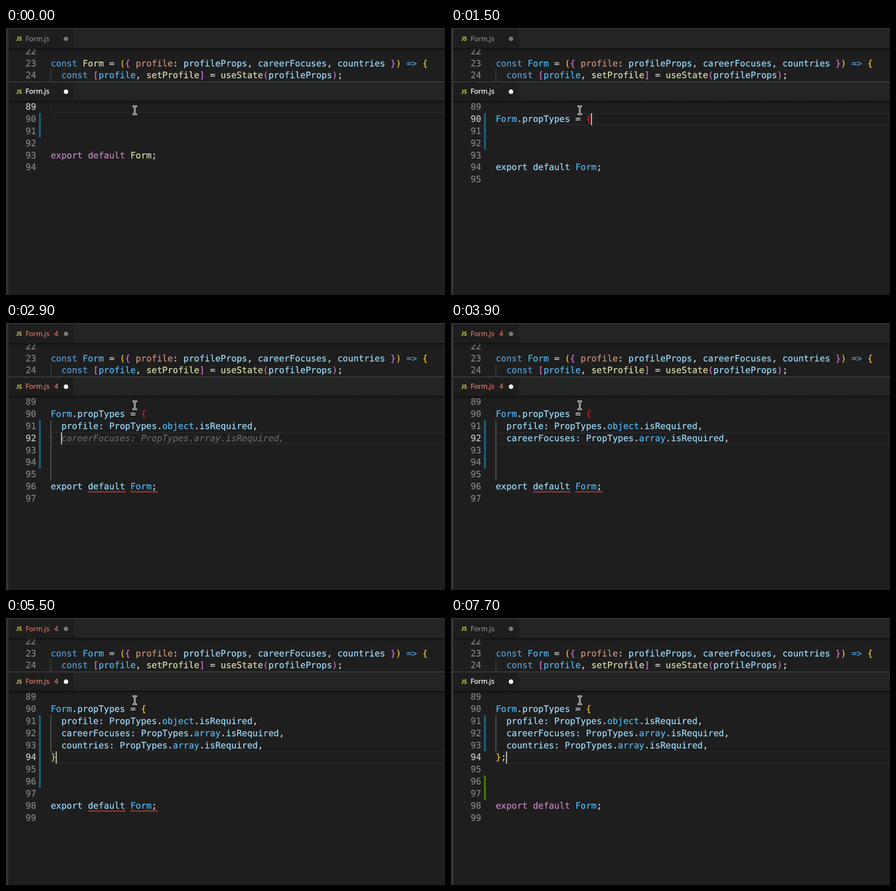
These frames come from a looping animation (900 px wide and 549 px high, 8.2 s). An HTML page:

```html
<!DOCTYPE html>
<html lang="en">
<head>
<meta charset="utf-8">
<title>Editor</title>
<style>
  html, body { margin: 0; width: 100%; height: 100%; overflow: hidden; background: #1e1e1e; }
  svg { display: block; width: 900px; height: 549px; }
  text { text-rendering: geometricPrecision; white-space: pre; fill: currentColor; stroke: currentColor; stroke-width: .25px; }
  .code { font: 18.08px "DejaVu Sans Mono", monospace; }
  .ghost { font-style: italic; color: #676767; }
  .tab { font: 14.1px "Noto Sans", "Open Sans", sans-serif; }
  .icon { font: bold 11.5px "Lato", sans-serif; color: #cbcb41; }
</style>
</head>
<body>
<svg viewBox="0 0 900 549">
  <defs>
    <pattern id="hatch" width="4" height="3" patternUnits="userSpaceOnUse">
      <path d="M-1 .75L5 -3.75M-1 3.75L5 -.75M-1 6.75L5 2.25" stroke="#1f86b3" stroke-width="1.5"/>
    </pattern>
    <linearGradient id="shade" x2="0" y2="1">
      <stop offset="0" stop-color="#0c0c0c" stop-opacity=".8"/>
      <stop offset="1" stop-color="#0c0c0c" stop-opacity="0"/>
    </linearGradient>
    <clipPath id="upper"><rect y="42" width="900" height="68"/></clipPath>
  </defs>
  <rect width="900" height="549" fill="#1e1e1e"/>
  <g id="top" clip-path="url(#upper)"></g>
  <g id="main"></g>
  <g id="tabs"></g>
  <rect width="5" height="549" fill="#333"/>
  <rect width="900" height="2" fill="#333"/>
  <g fill="none" stroke-linecap="square">
    <path d="M261.3 161h5.4M264 161v16.4M261.3 177.4h5.4" stroke="#e6e6e6" stroke-width="3.4"/>
    <path d="M261.5 161h5M264 161v16.4M261.5 177.4h5" stroke="#222" stroke-width="1"/>
  </g>
</svg>
<script>
const LOOP = 8200, LEFT = 91.7, CHAR = 10.885, LINE = 24.85, TOP = 150.2, BASE = 18;

const COLORS = {
  k: '#569cd6', f: '#dcdcaa', c: '#4fb8f5', v: '#9cdcfe', p: '#d4d4d4', s: '#ce9178',
  g: '#f5cb2b', m: '#d070cc', r: '#d02020', e: '#c586c0'
};

// caret moves: time, column
const CARET = [[300, 0], [600, 0], [1300, 18], [1900, 0], [2500, 39], [2900, 2],
  [3400, 44], [4000, 2], [4300, 40], [4700, 2], [5500, 1], [5700, 2]];

const ENTERS = [600, 1900, 2900, 4000, 4700];

// suggested lines: key, member, shown, accepted, coloured
const PROPS = [
  ['profile', 'object', 2100, 2500, 2700],
  ['careerFocuses', 'array', 2900, 3400, 3500],
  ['countries', 'array', 4100, 4300, 4500]
];

const $ = id => document.getElementById(id);
const rowY = row => TOP + LINE * row;
const colX = col => LEFT + CHAR * col;

const text = (x, y, str, cls, color) =>
  `<text x="${x}" y="${y}" class="${cls}"${color ? ` color="${color}"` : ''}>${str}</text>`;

const rect = (x, y, w, h, fill) =>
  `<rect x="${x}" y="${y}" width="${w}" height="${h}" fill="${fill}"/>`;

const escape = str => str.replace('>', '&gt;');

// each token is a colour letter followed by its text
function code(y, tokens, col = 0) {
  return tokens.map(token => {
    const str = token.slice(1), x = colX(col);
    col += str.length;
    return text(x, y + BASE, escape(str.trimEnd()), 'code', COLORS[token[0]]);
  }).join('');
}

const ghost = (row, col, str) => text(colX(col), rowY(row) + BASE, str, 'code ghost');

const lineNo = (y, n, active) => text(40.2, y + BASE, n, 'code', active ? '#c6c6c6' : '#858585');

function squiggle(col, chars, y) {
  let x = colX(col), d = `M${x} ${y}`;
  const end = colX(col + chars);
  for (let up = true; x < end; up = !up) {
    x = Math.min(x + 3.4, end);
    d += `L${x} ${up ? y - 2.6 : y}`;
  }
  return `<path d="${d}" fill="none" stroke="#e04b45" stroke-width="1.3"/>`;
}

const guide = (y, end, color) => rect(91.4, y, 1.4, end - y, color);

function tab(y, active, failed) {
  const mid = y + 20;
  const label = failed ? (active ? '#e27b68' : '#d57362') : active ? '#fff' : '#8b8b8b';
  return rect(0, y, 900, 39, '#232525') + rect(5, y, 134, 39, '#1e1e1e') +
    rect(0, y + 39, 900, 6, 'url(#shade)') +
    text(21.3, mid + 4, 'JS', 'icon') +
    text(40, mid + 4.6, 'Form.js', 'tab', label) +
    (failed ? text(99, mid + 4.6, '4', 'tab', label) : '') +
    `<circle cx="123" cy="${mid + .3}" r="4.6" fill="${active ? '#fff' : '#777'}"/>`;
}

function drawTop(broken) {
  const y = 60.6;
  return lineNo(y - LINE, 22) + lineNo(y, 23) + lineNo(y + LINE, 24) +
    code(y, ['kconst ', (broken ? 'c' : 'f') + 'Form ', 'p= ', 'g(', 'm{ ', 'sprofile', 'p: ',
      'vprofileProps', 'p, ', 'vcareerFocuses', 'p, ', 'vcountries ', 'm}', 'g) ', 'k=> ', 'g{']) +
    guide(y + LINE, 110, '#4a4a4a') +
    code(y + LINE, ['kconst ', 'm[', 'cprofile', 'p, ', 'fsetProfile', 'm] ', 'p= ',
      'fuseState', 'm(', 'vprofileProps', 'm)', 'p;'], 2);
}

function drawMarks(t, cur) {
  const first = t < 600 || (t >= 800 && t < 1900) ? 1 : 2;
  const done = t >= 5800;
  const last = done ? 4 : cur + 2;
  const bar = (a, b, fill) => rect(67.6, rowY(a), 3.8, rowY(b + 1) - rowY(a), fill);
  return bar(first, last, 'url(#hatch)') + (done ? bar(7, 8, '#487e02') : '');
}

function drawProp([key, member, shown, accepted, coloured], row, t) {
  if (t < shown) return '';
  if (t < accepted) return ghost(row, 2, `${key}: PropTypes.${member}.isRequired,`);
  const ready = t >= coloured;
  return code(rowY(row), [(ready ? 'v' : 'p') + key, 'v: ', 'vPropTypes', 'p.',
    (ready ? 'c' : 'v') + member, 'p.', 'visRequired', 'p,'], 2);
}

function drawCaret(t, cur) {
  const move = CARET.filter(m => m[0] <= t).pop();
  if (!move || (t - move[0]) % 1000 >= 500) return '';
  return rect(colX(move[1]) - .7, rowY(cur), 2.2, LINE, '#c4c5c3');
}

function drawMain(t) {
  const cur = ENTERS.filter(at => at <= t).length;
  const exportRow = cur + 4, exportY = rowY(exportRow);
  const broken = t >= 1500 && t < 5700;
  const closed = t >= 5500;
  let out = `<rect x="92.4" y="${rowY(cur) + 1}" width="820" height="${LINE - 1.9}" fill="none" stroke="#2a2a2a" stroke-width="1.7"/>`;

  for (let i = 0; i <= cur + 5; i++) out += lineNo(rowY(i), 89 + i, i === cur);
  out += drawMarks(t, cur);
  if (t >= 2500) out += guide(rowY(2), closed ? rowY(5) : exportY, '#6a6a6a');

  if (t >= 1300) {
    out += code(rowY(1), [(t < 1500 ? 'v' : 'c') + 'Form', 'p.', 'vpropTypes ', 'p= ', (closed ? 'g' : 'r') + '{']);
  } else if (t >= 800) {
    out += ghost(1, 0, 'Form.propTypes = {');
  }
  PROPS.forEach((prop, i) => out += drawProp(prop, i + 2, t));
  if (closed) out += code(rowY(5), t < 5700 ? ['g}'] : ['g}', 'p;']);

  const word = broken ? 'v' : 'e';
  out += code(exportY, [word + 'export ', word + 'default ', (t < 1500 ? 'f' : 'c') + 'Form', 'p;']);
  if (t >= 1600 && t < 5800) out += squiggle(7, 7, exportY + 24.3) + squiggle(15, 5, exportY + 24.3);
  return out + drawCaret(t, cur);
}

function render(t) {
  const failed = t >= 1700 && t < 5900;
  $('top').innerHTML = drawTop(t >= 1500);
  $('main').innerHTML = drawMain(t);
  $('tabs').innerHTML = tab(2, false, failed) + tab(110.6, true, failed) + rect(0, 110, 900, 1.5, '#444');
}

let start = null, last = -1;
function tick(now) {
  if (start === null) start = now;
  const t = Math.floor(((now - start) % LOOP) / 100) * 100;
  if (t !== last) render(last = t);
  requestAnimationFrame(tick);
}
render(0);
requestAnimationFrame(tick);
</script>
</body>
</html>
```
